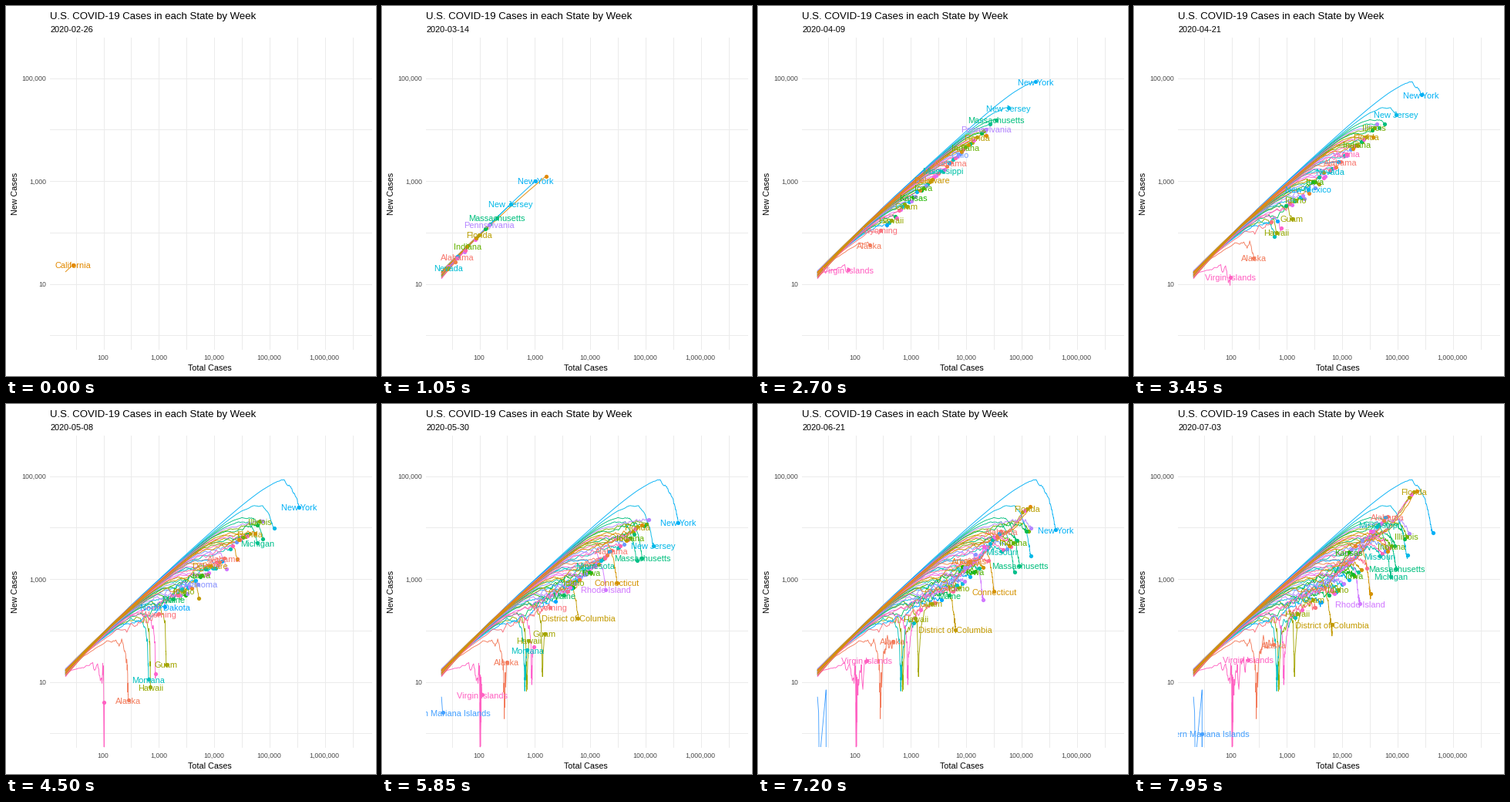
A matplotlib script for the animation above (8000 ms loop, 480 by 480 pixels).

```python
import numpy as np
import matplotlib.pyplot as plt
from matplotlib.animation import FuncAnimation
from matplotlib.patches import Rectangle

plt.rcParams["font.family"] = "Liberation Sans"

SIZE, DPI = 480, 72
LEFT, RIGHT, TOP, BOTTOM = 57, 474, 41, 445
DAYS_PER_STEP = 2.41
FRAMES, INTERVAL, HOLD = 160, 50, 3
PEAK_DAY, END_DAY = 44, 128

# From the largest spring outbreak to the smallest
RANKED = """New York,New Jersey,Massachusetts,Michigan,Pennsylvania,Illinois,Louisiana
California,Florida,Texas,Georgia,Maryland,Connecticut,Indiana,Washington,Colorado,Ohio
Rhode Island,Virginia,Missouri,Alabama,North Carolina,Arizona,Tennessee,Mississippi,Nevada
Wisconsin,South Carolina,Utah,Delaware,District of Columbia,Minnesota,Oklahoma,Iowa
Kentucky,Arkansas,New Mexico,Oregon,Kansas,Puerto Rico,New Hampshire,Guam,Idaho,Nebraska
South Dakota,West Virginia,Vermont,Maine,Hawaii,Montana,North Dakota,Wyoming,Alaska
Virgin Islands,Northern Mariana Islands""".replace("\n", ",").split(",")
FADING = {"New York", "New Jersey", "Massachusetts", "Michigan", "Connecticut",
          "Rhode Island", "District of Columbia"}
SURGING = {"California", "Florida", "Texas", "Georgia", "Alabama", "North Carolina",
           "Arizona", "Tennessee", "Mississippi", "Nevada", "South Carolina", "Utah",
           "Oklahoma", "Arkansas", "Oregon", "Kansas"}
COLLAPSING = {"Guam", "Vermont", "Hawaii", "Montana", "Alaska", "Virgin Islands"}
LAST_TO_START = RANKED[-1]

rng = np.random.default_rng(7)


def px(log_total):
    return 126 + 71.8 * (log_total - 2)


def py(log_new):
    return 360.2 - 66.75 * (log_new - 1)


def hue_color(hue, chroma=100, light=65):
    """Polar CIELUV to sRGB."""
    a = np.radians(hue)
    u = chroma * np.cos(a) / (13 * light) + 0.1978
    v = chroma * np.sin(a) / (13 * light) + 0.4683
    y = ((light + 16) / 116) ** 3
    xyz = np.array([9 * y * u / (4 * v), y, y * (12 - 3 * u - 20 * v) / (4 * v)])
    rgb = np.array([[3.2405, -1.5371, -0.4985],
                    [-0.9693, 1.8760, 0.0416],
                    [0.0556, -0.2040, 1.0572]]) @ xyz
    rgb = np.clip(rgb, 0, 1)
    return tuple(np.where(rgb > 0.0031308, 1.055 * rgb ** (1 / 2.4) - 0.055, 12.92 * rgb))


def progress(days, start, end=END_DAY):
    return np.clip((days - start) / (end - start), 0, 1)


def trend(name, rank, days):
    """Change of log10 new cases after the spring peak."""
    if name in FADING:
        onset = PEAK_DAY + 14 * (1 - np.exp(-rank / 3))
        return -np.sin(np.pi / 2 * progress(days, onset))
    if name in SURGING:
        return 0.85 * progress(days, 55) ** 2.5
    if name in COLLAPSING:
        return -rng.uniform(1.2, 1.6) * np.exp(-((days - 78) / 18) ** 2)
    w = progress(days, PEAK_DAY)
    return (0.012 * rank - 0.2) * w + 0.2 * np.sin(np.pi * w)


def running_total(new, base):
    """Each total is the total one week earlier plus the week's new cases."""
    total = np.empty(new.size)
    for k in range(new.size):
        before = total[k - 7] if k >= 7 else base * (total[0] / base) ** (k / 7) if k else base
        total[k] = before + new[k]
    return np.maximum.accumulate(total)


def build_path(name):
    """Days and pixel positions of one place."""
    if name == LAST_TO_START:
        days = np.arange(84, END_DAY + 2)
        log_new = np.interp(days, (84, 94, 99, 113, 116, 128), (0.7, 0.4, -0.6, 0.84, -0.6, 0))
        return days, px(np.interp(days, (84, 99, 113), (1.32, 1.35, 1.475))), py(log_new)

    rank = RANKED.index(name)
    peak = 4.15 - 0.039 * rank + 0.75 * (np.exp(-rank / 1.1) - np.exp((rank - 53) / 1.1))
    start = -1 if name == "California" else int(25 - 4.5 * (peak - 1.2))
    days = np.arange(start, END_DAY + 2)
    low = rng.uniform(1.1, 1.26)
    growth = 1 - (1 - progress(days, start, PEAK_DAY)) ** 2.4
    log_new = low + (peak - low) * growth + trend(name, rank, days)
    total = running_total(10 ** log_new, 21 - 10 ** low)

    # small counts flicker more than large ones
    noise = np.convolve(rng.normal(size=days.size + 2), np.ones(3) / 3, mode="valid")
    sigma = 0.02 + 0.9 / np.sqrt(10 ** log_new)
    log_new = log_new + noise * sigma * (0.05 + 0.95 * progress(days, 32, 50))
    return days, px(np.log10(total)), py(np.maximum(log_new, -0.6))


fig = plt.figure(figsize=(SIZE / DPI, SIZE / DPI), dpi=DPI, facecolor="white")
ax = fig.add_axes([0, 0, 1, 1])
ax.set(xlim=(0, SIZE), ylim=(SIZE, 0))
ax.axis("off")
panel = Rectangle((LEFT, TOP), RIGHT - LEFT, BOTTOM - TOP, fc="none", ec="none")
ax.add_patch(panel)

GRID = dict(color="#EBEBEB", lw=1, zorder=0)
for k in np.arange(1.5, 7, 0.5):
    x = np.floor(px(k)) + 0.5
    ax.plot([x, x], [TOP, BOTTOM], **GRID)
for k in range(6):
    y = np.floor(py(k)) + 0.5
    ax.plot([LEFT, RIGHT], [y, y], **GRID)

TICK = dict(size=8.8, color="#4D4D4D")
for k in range(2, 7):
    ax.text(px(k), 458.7, f"{10 ** k:,}", ha="center", **TICK)
for k in (1, 3, 5):
    ax.text(52, py(k) + 3.8, f"{10 ** k:,}", ha="right", **TICK)
ax.text(57, 17, "U.S. COVID-19 Cases in each State by Week", size=13.2)
date = ax.text(57, 34, "", size=11)
ax.text(264.5, 473, "Total Cases", size=10.8, ha="center")
ax.text(12, 243, "New Cases", size=10.8, rotation=90, ha="center", va="center")


class Place:
    def __init__(self, name, color):
        self.days, self.x, self.y = build_path(name)
        self.trail, = ax.plot([], [], color=color, lw=0.9, zorder=1)
        self.dot, = ax.plot([], [], "o", color=color, ms=5.2, mew=0, zorder=2)
        self.label = ax.text(0, 0, name, color=color, size=11, ha="center",
                             clip_on=True, zorder=3)
        self.half = self.label.get_window_extent().width / 2
        for artist in (self.trail, self.dot, self.label):
            artist.set_clip_path(panel)

    def move(self, t):
        """Advance to day t and return the head, or None before the start."""
        self.label.set_visible(False)
        if t < self.days[0]:
            self.trail.set_data([], [])
            self.dot.set_data([], [])
            return None
        head = np.interp(t, self.days, self.x), np.interp(t, self.days, self.y)
        n = np.searchsorted(self.days, t, side="right")
        self.trail.set_data(np.r_[self.x[:n], head[0]], np.r_[self.y[:n], head[1]])
        self.dot.set_data([head[0]], [head[1]])
        return head


def stacking(name):
    return name.startswith(("Ar", "C", "D")), name


names = sorted(RANKED)
colors = {name: hue_color(15 + 360 * i / len(names)) for i, name in enumerate(names)}
places = [Place(name, colors[name]) for name in sorted(names, key=stacking)]


def update(frame):
    t = DAYS_PER_STEP * (frame // HOLD)
    date.set_text(str(np.datetime64("2020-02-26") + int(round(t))))
    taken = []
    for p in places:
        head = p.move(t)
        if head is None:
            continue
        x, y = head
        # a label is dropped where it would cover an earlier one
        if all(abs(x - a) > p.half + w or abs(y - b) > 8.8 for a, b, w in taken):
            taken.append((x, y, p.half))
            p.label.set_position((x, y + 4.4))
            p.label.set_visible(True)
    return []


animation = FuncAnimation(fig, update, frames=FRAMES, interval=INTERVAL,
                          repeat=True, repeat_delay=0)
plt.show()
```
